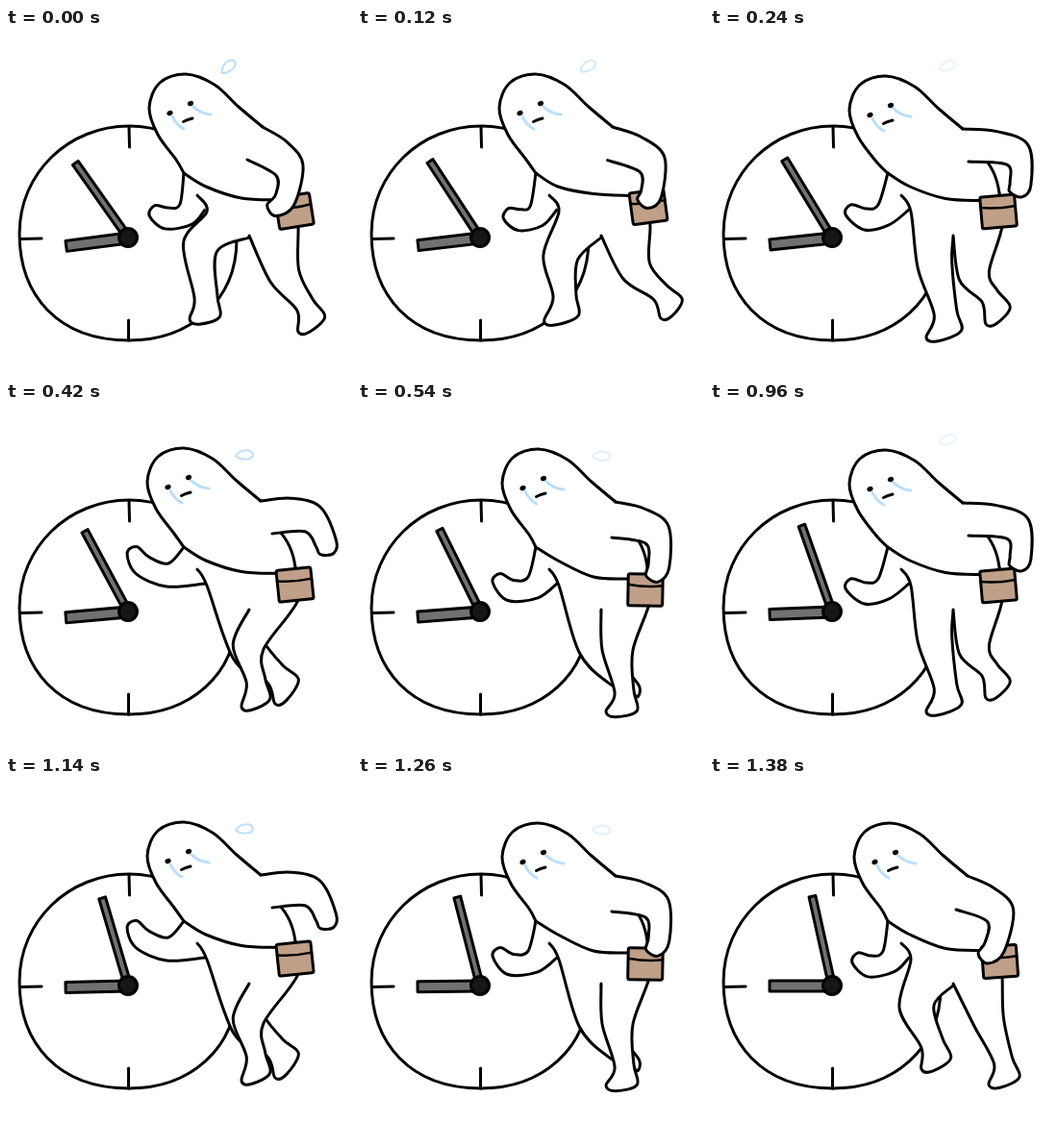
An HTML page with a canvas that plays this animation: 360 by 360 pixels, repeating every 1.44 s.

```html
<!DOCTYPE html>
<html lang="en">
<head>
<meta charset="utf-8">
<title>Walking against the clock</title>
<style>
  html, body { margin: 0; width: 100%; height: 100%; overflow: hidden; background: #fff; }
  canvas { display: block; }
</style>
</head>
<body>
<canvas id="stage" width="360" height="360"></canvas>
<script>
const LOOP = 1440, STEP = 60, STRIDE = 720;
const INK = '#000', BLUE = '#b9defd', STEEL = '#717171';
const ctx = document.getElementById('stage').getContext('2d');

// Joints of the walker at key times (ms) of one stride.
// leg: knee, ankle, toe; arm: elbow, wrist, hand; bag: centre, tilt; head: sway
const poses = [
  { time: 0, head: [0, 0], bag: [300, 190, -9], pit: [251, 137],
    nearLeg: [202, 228, 208, 280, 191, 303], farLeg: [290, 258, 311, 288, 304, 316],
    nearArm: [187, 194, 167, 198, 152, 190], farArm: [295, 148, 290, 179, 276, 190] },
  { time: 60, head: [-1, -1], bag: [303, 183, -9], pit: [255, 137],
    nearLeg: [199, 235, 200, 270, 178, 296], farLeg: [297, 250, 326, 273, 329, 299],
    nearArm: [188, 196, 171, 200, 159, 195], farArm: [299, 147, 296, 178, 285, 188] },
  { time: 240, head: [-4, 2], bag: [300, 190.5, -5], pit: [269, 139],
    nearLeg: [234, 247, 245, 296, 225, 322], farLeg: [275, 258, 291, 279, 287, 308],
    nearArm: [181, 194, 162, 199, 144, 189], farArm: [320, 132, 323, 162, 318, 173] },
  { time: 420, head: [-2, 0], bag: [300.5, 189.5, -6], pit: [277, 137],
    nearLeg: [252, 258, 280, 283, 280, 314], farLeg: [252, 255, 260, 290, 245, 317],
    nearArm: [168, 180, 142, 170, 131, 154], farArm: [319, 122, 333, 147, 334, 158] },
  { time: 540, head: [1, 1], bag: [299, 195, 1], pit: [264, 141],
    nearLeg: [246, 252, 270, 285, 286, 304], farLeg: [270, 258, 277, 301, 258, 322],
    nearArm: [182, 193, 159, 196, 144, 183], farArm: [311, 138, 313, 170, 306, 184] },
  { time: 660, head: [1, 1], bag: [301.5, 192.5, -4], pit: [256, 139],
    nearLeg: [215, 240, 231, 278, 220, 305], farLeg: [290, 255, 305, 296, 290, 321],
    nearArm: [186, 193, 166, 198, 151, 189], farArm: [302, 145, 296, 178, 284, 190] }
];

const mix = (a, b, k) => a + (b - a) * k;
const between = (p, q, k) => p.map((v, i) => mix(v, q[i], k));
const shift = (p, d, amount) => [p[0] + d[0] * amount, p[1] + d[1] * amount];
const unit = ([x, y]) => [x / Math.hypot(x, y), y / Math.hypot(x, y)];
const heading = (p, q) => unit([q[0] - p[0], q[1] - p[1]]);
const leftOf = ([x, y]) => [-y, x];
const pairs = flat => flat.flatMap((x, i) => i % 2 ? [] : [[x, flat[i + 1]]]);

function poseAt(phase) {
  const i = poses.findLastIndex(pose => pose.time <= phase);
  const from = poses[i], to = poses[i + 1] || { ...poses[0], time: STRIDE };
  const k = (phase - from.time) / (to.time - from.time);
  const pose = {};
  for (const name in from) if (name !== 'time') pose[name] = between(from[name], to[name], k);
  return pose;
}

// Smooth curve through all points
function curve(pts) {
  const path = new Path2D();
  path.moveTo(...pts[0]);
  for (let i = 0; i < pts.length - 1; i++) {
    const b = pts[i], c = pts[i + 1], a = pts[i - 1] || b, d = pts[i + 2] || c;
    path.bezierCurveTo(
      b[0] + (c[0] - a[0]) / 6, b[1] + (c[1] - a[1]) / 6,
      c[0] - (d[0] - b[0]) / 6, c[1] - (d[1] - b[1]) / 6, ...c);
  }
  return path;
}

// Both edges of a limb that leaves the root and bends at each joint
function edges(root, joints, halfWidths) {
  const left = [], right = [];
  let along = heading(root, joints[0]);
  joints.forEach((joint, i) => {
    const next = joints[i + 1] ? heading(joint, joints[i + 1]) : along;
    const normal = leftOf(unit([along[0] + next[0], along[1] + next[1]]));
    left.push(shift(joint, normal, halfWidths[i]));
    right.unshift(shift(joint, normal, -halfWidths[i]));
    along = next;
  });
  return { left, right, along };
}

function legOutline(root, flat, knee, ankle) {
  const [k, a, toe] = pairs(flat);
  const { left, right, along } = edges(root, [k, a], [knee, ankle]);
  const heel = shift(right[0], along, 22);
  const sole = shift(between(toe, heel, .3), along, 6);
  return [...left, toe, sole, heel, ...right];
}

function paint(path, { fill, stroke = INK, width = 3 } = {}) {
  if (fill) { ctx.fillStyle = fill; ctx.fill(path); }
  ctx.strokeStyle = stroke;
  ctx.lineWidth = width;
  ctx.stroke(path);
}

const solid = pts => paint(curve(pts), { fill: '#fff' });

function placed(x, y, degrees, draw) {
  ctx.save();
  ctx.translate(x, y);
  ctx.rotate(degrees * Math.PI / 180);
  draw();
  ctx.restore();
}

const dial = new Path2D('M14 214C14 150 66 102 128 102C190 102 240 150 240 220C240 285 190 325 128 325C54 325 14 278 14 214Z');
const ticks = new Path2D('M128 103L128.500 124M15 219.500L37 219M127.500 304V325');
const minuteHand = new Path2D('M-3.5 0V-95H3.5V0Z');
const hourHand = new Path2D('M0 -5H-65V6H0Z');
const hub = new Path2D('M-9.5 0a9.5 9.5 0 1 0 19 0a9.5 9.5 0 1 0 -19 0');
const drop = new Path2D('M-9 1C-4 -6 8 -7 9 0C8 6 -4 6 -9 1Z');
const spine = new Path2D('M283 133Q298 148 301 172');
const hips = new Path2D('M199 174L209 191L253 218L304 206L301 172L230 160Z');
const tears = new Path2D('M173 92Q177 101 185 105M194 81Q202 89 213 90');
const mouth = new Path2D('M184.500 97.500Q188 95.500 194 94');
const torso = pairs([185, 151, 177, 137, 158, 111, 149, 83, 160, 57, 187, 48, 217, 59, 242, 82, 267, 103]);

function drawClock(time) {
  const k = time / (LOOP - STEP);
  paint(dial, { fill: '#fff' });
  paint(ticks);
  placed(127, 218, mix(-7.4, 0, k), () => paint(hourHand, { fill: STEEL }));
  placed(127, 218, mix(-35.2, -12.5, k), () => paint(minuteHand, { fill: STEEL }));
  placed(127, 218, 0, () => paint(hub, { fill: '#161616' }));
}

function drawBag() {
  const box = new Path2D();
  box.roundRect(-18, -16, 36, 33, 2);
  paint(box, { fill: '#bf9f88' });
  paint(new Path2D('M-18 -5Q0 -2 18 -4'), { width: 2.5 });
}

function drawFace() {
  paint(tears, { stroke: BLUE });
  ctx.fillStyle = INK;
  for (const [x, y] of [[170.5, 88.5], [192, 78.5]]) {
    ctx.beginPath();
    ctx.ellipse(x, y, 3.2, 2.5, -.5, 0, 7);
    ctx.fill();
  }
  paint(mouth);
}

// A drop flies up and fades, then a second one lower down
function drawDrop(phase) {
  if (phase > 630) return;
  const first = phase < 330;
  const k = first ? phase / 240 : (phase - 420) / 120;
  const [x, y, tilt, alpha] = first
    ? between([231, 40.5, -38, 1], [247, 39.5, -18, .3], k)
    : between([248, 55, 0, .95], [253, 56, 6, .45], k);
  ctx.globalAlpha = Math.max(0, Math.min(1, alpha));
  placed(x, y, tilt, () => paint(drop, { stroke: BLUE, width: 2 }));
  ctx.globalAlpha = 1;
}

function drawBody(dx, dy, bagX, bagY) {
  const body = torso.map(([x, y], i) => i ? [x + dx, y + dy] : [x, y]);
  const belly = [torso[0], [208, 165], [245, bagY - 13], [bagX - 17, bagY - 11]];
  const outline = curve(body);
  const inside = new Path2D(outline);
  for (const p of [[283, 133], [301, 172], ...belly.toReversed()]) inside.lineTo(...p);
  ctx.fillStyle = '#fff';
  ctx.fill(inside);
  paint(outline);
  paint(curve(belly));
  paint(spine);
  return body.at(-1);
}

function drawWalker(phase) {
  const { head, bag, pit, nearArm, farArm, nearLeg, farLeg } = poseAt(phase);
  const [dx, dy] = head;

  const near = edges([205, 172], pairs(nearArm), [12, 11, 6]);
  solid([[185, 151], ...near.left, ...near.right, [207, 189]]);

  ctx.fillStyle = '#fff';
  ctx.fill(hips);
  solid([[199, 174], [209, 191], ...legOutline([227, 195], nearLeg, 18, 12), [253, 218]]);
  solid([[253, 216], ...legOutline([279, 211], farLeg, 16, 10), [304, 206], [301, 172]]);

  const shoulder = drawBody(dx, dy, bag[0], bag[1]);
  placed(...bag, drawBag);

  const far = edges(between(shoulder, pit, .5), pairs(farArm), [15, 11, 7]);
  const elbow = far.right.at(-1);
  const upperArm = shift(between(elbow, shoulder, .5), leftOf(heading(elbow, shoulder)), 6);
  solid([pit, ...far.left, ...far.right, upperArm, shoulder]);

  placed(dx, dy, 0, drawFace);
  drawDrop(phase);
}

function render(now) {
  const time = Math.floor(now % LOOP / STEP) * STEP;
  ctx.fillStyle = '#fff';
  ctx.fillRect(0, 0, 360, 360);
  ctx.lineCap = ctx.lineJoin = 'round';
  drawClock(time);
  drawWalker(time % STRIDE);
}

const start = performance.now();
function tick() {
  render(performance.now() - start);
  requestAnimationFrame(tick);
}
tick();
</script>
</body>
</html>
```
